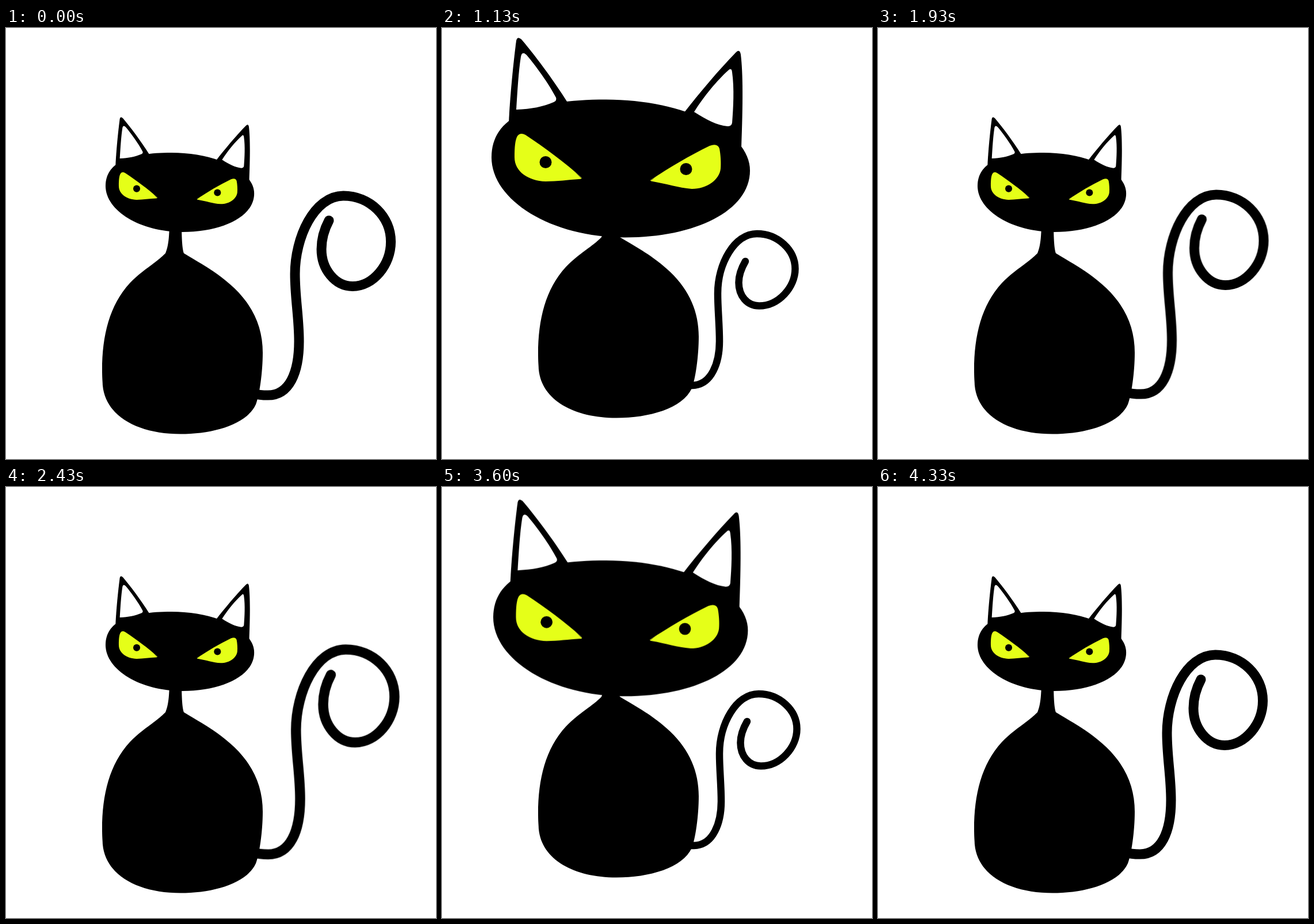
These frames come from a looping animation (747x750 px, 4.36 s). An HTML page without scripts:

```html
<!DOCTYPE html>
<html lang="en">
<head>
<meta charset="utf-8">
<title>Black cat</title>
<style>
  @property --grow { syntax: "<number>"; inherits: true; initial-value: 0; }
  @property --lid { syntax: "<angle>"; inherits: true; initial-value: 50deg; }

  html, body { margin: 0; width: 100%; height: 100%; overflow: hidden; background: #fff; }
  svg {
    display: block; width: 100%; height: 100%;
    animation: grow 4.36s linear infinite, blink 4.36s linear infinite;
  }

  .body { transform: translateY(calc(var(--grow) * -28px)); }
  .head {
    transform-origin: 290.6px 342px;
    transform: scale(calc(.575 + .425 * var(--grow)));
  }
  .eye { fill: #e5ff18; }
  .ear { fill: #fff; }
  .lid { fill: #5b6023; }
  .lid.left { transform-origin: 243px 262px; transform: rotate(var(--lid)); }
  .lid.right { transform-origin: 362px 265px; transform: rotate(calc(var(--lid) * -1)); }
  .sway { transform-origin: 440px 632px; animation: sway 4.36s linear infinite; }
  .tail {
    fill: none; stroke: #000; stroke-linecap: round;
    animation: curl 4.36s linear infinite;
  }

  /* 0 = small head on a low body, 1 = big head on a raised body */
  @keyframes grow {
    0%, 6.9%, 35.8%, 60.3%, 89.3%, 100% { --grow: 0; }
    7.7%, 34.4%, 61.2%, 88% { --grow: .05; }
    10%, 63.5% { --grow: .605; }
    12.6%, 28.3%, 65.8%, 81.8% { --grow: 1; }
    29.06%, 82.57% { --grow: .967; }
    32.04%, 85.55% { --grow: .72; }
    32.8%, 86.47% { --grow: .415; }
  }
  @keyframes blink {
    0%, 7.3%, 12.2%, 29.8%, 38.2%, 60.8%, 65.7%, 83.3%, 91.7%, 100% { --lid: 50deg; }
    9%, 34%, 62.5%, 87.6% { --lid: 3deg; }
    10%, 63.5% { --lid: 16deg; }
    32.8%, 86.47% { --lid: 9deg; }
  }
  @keyframes sway {
    0%, 7.5%, 13.1%, 25%, 32.8%, 47%, 53%, 63.5%, 78%, 86.5%, 96%, 100% { transform: translate(0, 0) scale(1); }
    5%, 70% { transform: translate(0, 0) scale(1.02); }
    18% { transform: translate(0, 0) scale(1.035); }
    36.7%, 90.4% { transform: translate(0, 0) scale(1.045); }
    44.3% { transform: translate(1.5px, -2px) scale(1); }
    59% { transform: translate(0, 0) scale(1.06); }
    61.5% { transform: translate(0, 0) scale(1.03); }
    82.57% { transform: translate(3px, 2px) scale(1); }
  }
  @keyframes curl {
    0%, 7%, 36%, 60.5%, 90%, 100% {
      stroke-width: 17px;
      d: path("M430 636C440 639 447 639 455 639C492 639 509 600 509 545C509 503 502 470 502 428C502 365 535 292 586 292C632 292 668.5 328 668.5 372C668.5 412 638 449.5 602 449.5C572 449.5 548 420 548 385C548 366 553 350 561 335");
    }
    32.8%, 86.47% {
      stroke-width: 15.5px;
      d: path("M428 625C434 625 440 625 445 625C486 624 507.5 580 507.5 530C507.5 495 502.5 465 502.5 430C502.5 375 538 301.5 586 301.5C630 301.5 668.5 334 668.5 376C668.5 416 632 455 591 455C566 455 548 437 548 410C548 394 553 379 562 363");
    }
    10%, 32.04%, 63.5%, 85.55% {
      stroke-width: 14px;
      d: path("M425 622C430 622 436 622 440 622C475 620 496.5 585 496.5 535C496.5 505 492 480 492 450C492 395 528 332 571 332C612 332 645 361 645 398C645 434 610 471.5 573 471.5C550 471.5 534 456 534 433C534 417 539 403 547 389");
    }
    13.1%, 29.06%, 66.5%, 82.6% {
      stroke-width: 12.5px;
      d: path("M425 622C430 622 436 622 440 621.5C467 618 482 585 482 545C482 515 479 490 479 462C479 410 508 358 547 358C583 358 613.5 386 613.5 419C613.5 451 585 483.5 551 483.5C530 483.5 515.5 466 515.5 443C515.5 430 520 418 527 406");
    }
  }
</style>
</head>
<body>
<svg viewBox="0 0 747 750">
  <defs>
    <path id="eyeL" d="M126 225C126 207 127 195 131 188Q136 181 145 186C178 208 215 235 242 260Q244 263 238 263C220 264 200 267 180 267C150 266 126 250 126 225Z"/>
    <path id="eyeR" d="M363 264C395 243 430 222 465 205Q479 200 482 210C484 220 485 235 484 245C482 264 460 280 434 280C410 278 390 271 366 267Q360 266 363 264Z"/>
    <clipPath id="clipL"><use href="#eyeL"/></clipPath>
    <clipPath id="clipR"><use href="#eyeR"/></clipPath>
  </defs>

  <g class="sway"><path class="tail"/></g>

  <path class="body" d="M284 330C284 365 282 380 277 392C262 408 238 420 215 444C180 482 167 535 167 595C167 612 168 615 168 622C173 676 230 706.5 303 706.5C360 706.5 418 690 434 655C440 640 446 600 446 565C446 522 430 485 397 453C365 423 340 411 309 392C306 383 305 365 305 330Z"/>

  <g class="head">
    <path d="M86 225C86 156 155 124.5 285 124.5C420 124.5 535 180 535 248C535 318 440 364.5 318 364.5C190 364.5 86 300 86 225Z"/>
    <path d="M116 165C118 120 124 60 129 22Q131 13 139 21C160 46 190 85 219 131V180H116Z"/>
    <path d="M420 148C448 112 480 74 510 43Q517 35 519 46C523 80 523 130 520 208L440 190Z"/>
    <path class="ear" d="M129 142C131 110 133 75 137 50Q139 39 147 47C163 66 185 96 198 121Q200 126 194 129C176 137 155 141 129 142Z"/>
    <path class="ear" d="M438 146C455 119 478 91 497 74Q503 68 504 77C508 105 506 140 504 165Q503 171 496 171C477 169 460 160 438 146Z"/>

    <use class="eye" href="#eyeL"/>
    <use class="eye" href="#eyeR"/>
    <circle cx="180" cy="233.5" r="10.5"/>
    <circle cx="424" cy="245.5" r="10.5"/>
    <g clip-path="url(#clipL)"><use class="lid left" href="#eyeL"/></g>
    <g clip-path="url(#clipR)"><use class="lid right" href="#eyeR"/></g>
  </g>
</svg>
</body>
</html>
```
